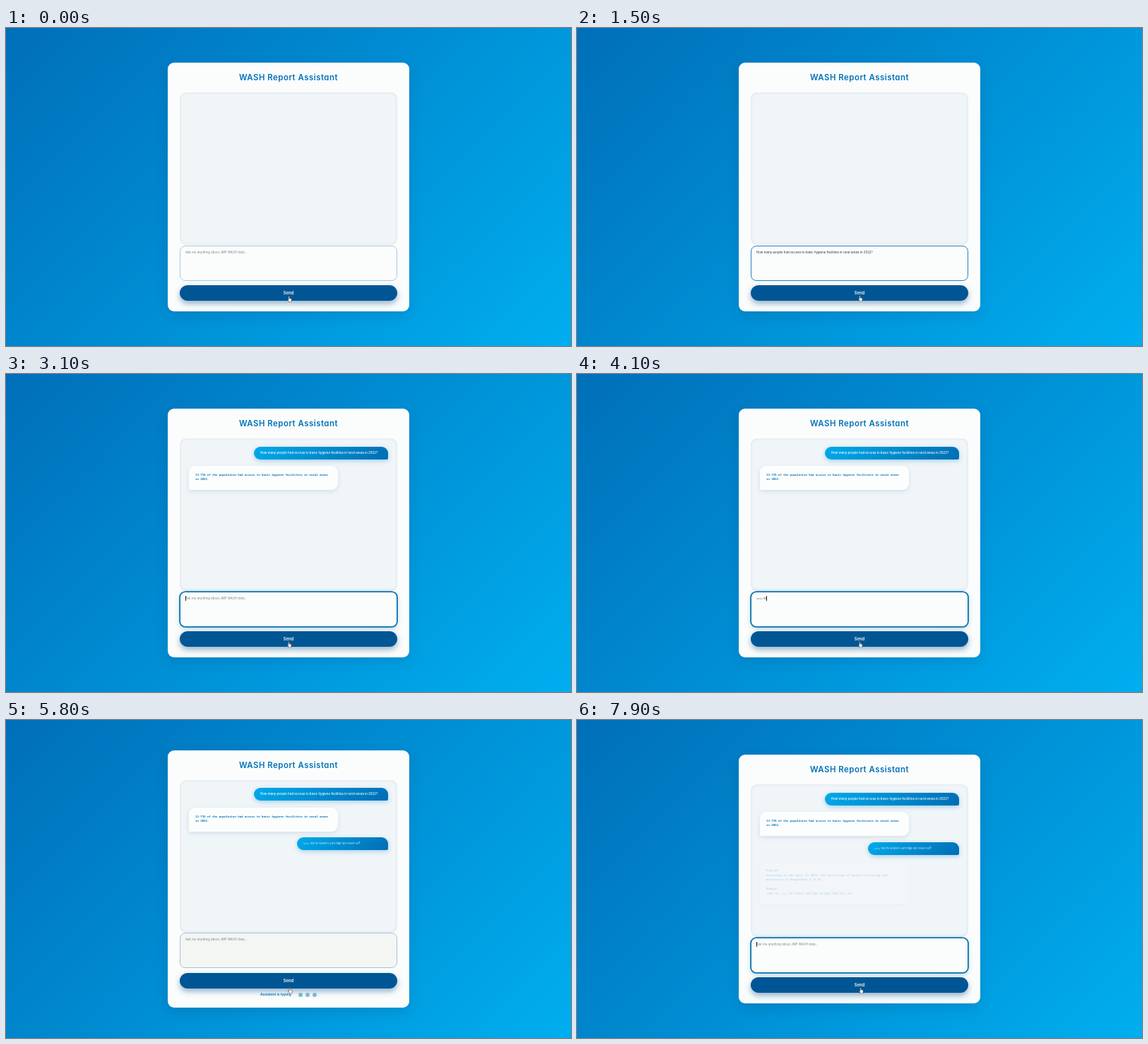
An HTML page for the animation above (8000 ms loop, 800 by 450 pixels).

```html
<!DOCTYPE html>
<html lang="en">
<head>
<meta charset="utf-8">
<title>WASH Report Assistant</title>
<style>
  html, body { margin: 0; width: 100%; height: 100%; overflow: hidden; }
  body {
    position: relative;
    background: linear-gradient(135deg, #006fb9, #00aeef);
    font-family: Inter, "Noto Sans", sans-serif;
    font-feature-settings: "cv11";
  }
  body * { position: absolute; box-sizing: border-box; white-space: pre; }

  /* Whole timeline: 8 s, so 1% = 80 ms */
  .card, .field, .hint, .typed, .reveal, .typed .caret, .start, .status, .msg, .hand {
    animation: 8s step-end infinite;
  }

  .card {
    left: 229px; top: 49px; width: 342px; height: 352px;
    border-radius: 9px; background: #fbfdfc;
    box-shadow: 0 6px 18px rgba(0, 50, 100, .16);
    animation-name: lift;
  }
  h1 {
    left: 0; top: 11px; width: 100%; margin: 0;
    font-size: 11.4px; line-height: 20px; font-weight: 600; letter-spacing: .5px;
    text-align: center; color: #0071b8;
  }
  .chat {
    left: 17px; top: 42px; width: 308px; height: 216px;
    border-radius: 9px; background: #f0f5f8;
    box-shadow: inset 0 0 4px rgba(0, 60, 110, .1);
  }

  .msg { border-radius: 9px; animation-timing-function: ease; }
  .user {
    right: 13px; height: 18.5px; padding: 0 9px;
    border-bottom-right-radius: 2px;
    background: linear-gradient(135deg, #00aaea, #006db4);
    box-shadow: 0 2px 6px rgba(0, 130, 205, .32);
    font-size: 4.4px; line-height: 18px; font-weight: 500; color: #fff;
  }
  .bot {
    left: 13px; width: 211px; padding: 9.6px 9px;
    border-bottom-left-radius: 2px; background: #fcfefe;
    box-shadow: 0 2px 6px rgba(0, 80, 140, .13);
    font: 600 4.02px/6.5px "Noto Sans Mono", "Noto Sans", monospace; color: #0872b3;
  }
  .m1 { top: 11.5px; width: 190px; animation-name: m1; }
  .m2 { top: 39px; height: 33.5px; animation-name: m2; }
  .m3 { top: 81.5px; width: 129px; animation-name: m3; }
  .m4 { top: 109.5px; height: 59.5px; animation-name: m4; }

  .field {
    left: 17px; top: 258.5px; width: 308px; height: 50px;
    border: 1px solid #a9c8de; border-radius: 8px; background: #fbfdfc;
    font-size: 4.4px; line-height: 8px; color: #26333d;
    animation-name: field;
  }
  .field > * { left: 7px; top: 5px; height: 8px; }
  .hint { color: #7b868e; animation-name: hint; }
  .q1 { animation-name: q1; }
  .q2 { animation-name: q2; }
  .reveal { position: static; display: block; }
  .q1 .reveal { animation-name: write1; }
  .q2 .reveal { animation-name: write2; }
  .start { animation-name: start; }
  .caret { left: 0; top: 0; width: .6px; height: 7px; }
  .caret::after { content: ""; position: absolute; inset: 0; background: #222; animation: blink 1s -.15s step-end infinite; }
  .q1 .caret { animation-name: move1; }
  .q2 .caret { animation-name: move2; }

  .send {
    left: 17px; top: 315.3px; width: 308px; height: 22px;
    border-radius: 11px; background: #005694;
    box-shadow: 0 4px 9px rgba(0, 75, 135, .42);
    font-size: 5.8px; line-height: 22px; font-weight: 600; text-align: center; color: #fff;
  }
  .status {
    left: 131px; top: 341.5px; height: 9px;
    font-size: 4.9px; line-height: 9px; font-weight: 600; color: #0871b3;
    animation-name: status;
  }
  .status i {
    top: 1.6px; width: 6px; height: 6px; border-radius: 50%;
    background: #0070b5; animation: pulse 1s infinite;
  }
  .status i:nth-child(1) { left: 54px; }
  .status i:nth-child(2) { left: 64px; animation-delay: -.7s; }
  .status i:nth-child(3) { left: 74px; }

  .hand { left: 397.6px; top: 378.6px; width: 7px; height: 9.5px; animation-name: nudge; }

  @keyframes lift {
    0%, 33.75%, 97.75% { top: 49px; height: 352px; }
    20%, 67.5% { top: 42.6px; height: 364.6px; }
  }
  @keyframes status {
    0%, 33.75%, 97.75% { visibility: hidden; }
    20%, 67.5% { visibility: visible; }
  }
  @keyframes field {
    0% { border-color: #a9c8de; background: #fbfdfc; box-shadow: none; }
    3.75%, 33.75%, 97.75% {
      border-color: #0a72ae; background: #fbfdfc;
      box-shadow: 0 0 0 .8px #0a72ae, 0 2px 7px rgba(0, 110, 170, .3);
    }
    17.5%, 65% { border-color: #2383bb; background: #fbfdfc; box-shadow: none; }
    20%, 67.5% { border-color: #a3c3da; background: #f4f6f4; box-shadow: none; }
  }
  @keyframes hint {
    0%, 20%, 67.5% { visibility: visible; }
    6.25%, 48.75% { visibility: hidden; }
  }
  @keyframes q1 { 0%, 20% { visibility: hidden; } 6.25% { visibility: visible; } }
  @keyframes q2 { 0%, 67.5% { visibility: hidden; } 48.75% { visibility: visible; } }
  @keyframes write1 {
    0%, 6.25% { clip-path: inset(-2px 100% -2px 0); animation-timing-function: steps(75); }
    15%, 100% { clip-path: inset(-2px 0 -2px 0); }
  }
  @keyframes write2 {
    0%, 48.75% { clip-path: inset(-2px 100% -2px 0); animation-timing-function: steps(40); }
    62.5%, 100% { clip-path: inset(-2px 0 -2px 0); }
  }
  @keyframes move1 {
    0%, 6.25% { left: 0; animation-timing-function: steps(75); }
    15% { left: 100%; opacity: 1; }
    17.5%, 100% { left: 100%; opacity: 0; }
  }
  @keyframes move2 {
    0%, 48.75% { left: 0; animation-timing-function: steps(40); }
    62.5% { left: 100%; opacity: 1; }
    65%, 100% { left: 100%; opacity: 0; }
  }
  @keyframes start {
    0%, 6.25%, 48.75% { visibility: hidden; }
    3.75%, 33.75%, 97.75% { visibility: visible; }
    20% { visibility: hidden; }
    67.5% { visibility: hidden; }
  }
  @keyframes blink { 0% { opacity: 1; } 50% { opacity: 0; } }
  @keyframes pulse { 0%, 50%, 100% { opacity: .45; } 15%, 25% { opacity: 1; } }

  @keyframes m1 { 0%, 20% { opacity: 0; } 25%, 100% { opacity: 1; } }
  @keyframes m2 { 0%, 33.75% { opacity: 0; } 38.5%, 100% { opacity: 1; } }
  @keyframes m3 { 0%, 67.5% { opacity: 0; } 72.5%, 100% { opacity: 1; } }
  @keyframes m4 { 0%, 97.75% { opacity: 0; animation-timing-function: linear; } 100% { opacity: .45; } }

  @keyframes nudge {
    0% { transform: none; }
    15% { transform: translate(-.4px, -.8px); }
    62.5% { transform: translate(.8px, -.8px); }
  }
</style>
</head>
<body>
  <main class="card">
    <h1>WASH Report Assistant</h1>
    <section class="chat">
      <div class="msg user m1">How many people had access to basic hygiene facilities in rural areas in 2022?</div>
      <div class="msg bot m2">13.71% of the population had access to basic hygiene facilities in rural areas
in 2022.</div>
      <div class="msg user m3" lang="bn">২০২২ সালে কি বাংলাদেশে এখনো উন্মুক্ত স্থানে মলত্যাগ হয়?</div>
      <div class="msg bot m4">English:
According to the data, in 2022, the percentage of people practicing open
defecation in Bangladesh is 0.45.

Bangla:
(ডেটার মতে, ২০২২ সালে বাংলাদেশে খোলা মলমূত্র করা মানুষের শতকরা হার ০.৪৫)</div>
    </section>
    <div class="field">
      <span class="hint">Ask me anything about JMP WASH data...</span>
      <span class="start"><i class="caret"></i></span>
      <span class="typed q1"><span class="reveal">How many people had access to basic hygiene facilities in rural areas in 2022?</span><i class="caret"></i></span>
      <span class="typed q2" lang="bn"><span class="reveal">২০২২ সালে কি বাংলাদেশে এখনো উন্মুক্ত স্থানে মলত্যাগ হয়?</span><i class="caret"></i></span>
    </div>
    <div class="send">Send</div>
    <div class="status">Assistant is typing<i></i><i></i><i></i></div>
  </main>
  <svg class="hand" viewBox="0 0 14 19">
    <path d="M4 11V2.5a1.5 1.5 0 0 1 3 0V7l4.5 1q1.8.5 1.6 2.5L12 15v3H5.500v-2L1.300 11.500q-.6-1.500 1-1.500z" fill="#fff" stroke="#222" stroke-width="1.100" stroke-linejoin="round"/>
  </svg>
</body>
</html>
```
